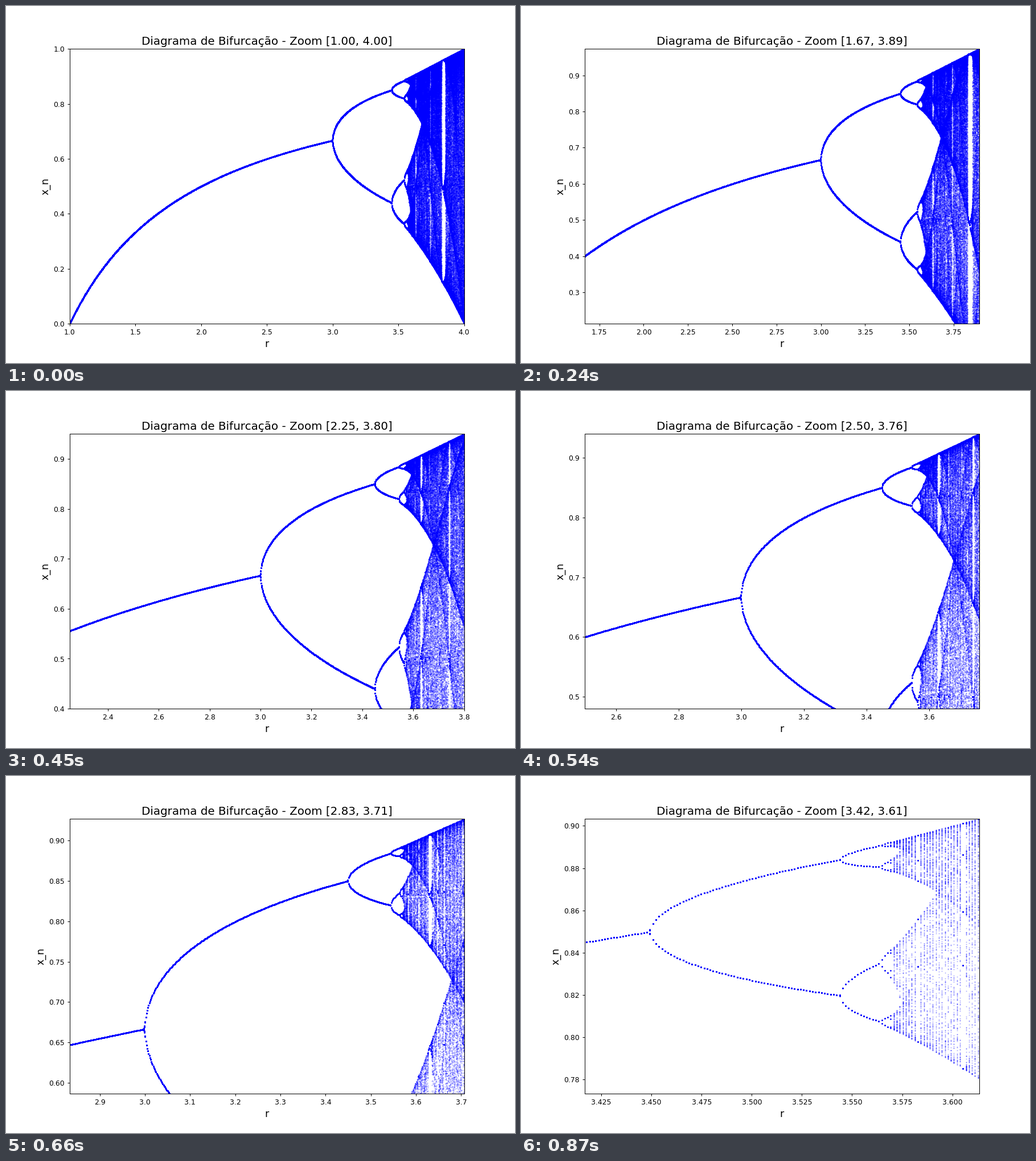
Recreate the animation shown at these times as a matplotlib script. Size 894 by 626 pixels, loop 0.9 s.

```python
import numpy as np
import matplotlib.pyplot as plt
from matplotlib.animation import FuncAnimation

DPI = 89.4
FRAMES = 30
COLUMNS = 2000
WARMUP, KEPT = 1000, 500

START = np.array([1.0, 4.0, 0.0, 1.0])  # r min, r max, x min, x max
END = np.array([3.5, 3.6, 0.8, 0.9])


def logistic_orbits():
    r = np.linspace(1, 4, COLUMNS)
    x = np.full(COLUMNS, 0.5)
    for _ in range(WARMUP):
        x = r * x * (1 - x)
    rs, xs = [], []
    for n in range(KEPT):
        x = r * x * (1 - x)
        # settled columns only repeat one value, so fewer points suffice
        keep = (r > 2.95) | (n % 3 == 0)
        rs.append(r[keep])
        xs.append(x[keep])
    return np.concatenate(rs), np.concatenate(xs)


R, X = logistic_orbits()

# the small margin keeps the canvas from truncating to 625 pixels
fig, ax = plt.subplots(figsize=(894.01 / DPI, 626.01 / DPI), dpi=DPI)
dots, = ax.plot([], [], "b.", markersize=1, alpha=0.35)
ax.set_xlabel("r", fontsize=14)
ax.set_ylabel("x_n", fontsize=14)
title = ax.set_title("", fontsize=16)


def update(i):
    r0, r1, x0, x1 = START + (END - START) * i / FRAMES
    pad_r, pad_x = (r1 - r0) / 200, (x1 - x0) / 200
    seen = ((R > r0 - pad_r) & (R < r1 + pad_r)
            & (X > x0 - pad_x) & (X < x1 + pad_x))
    dots.set_data(R[seen], X[seen])
    ax.set_xlim(r0, r1)
    ax.set_ylim(x0, x1)
    title.set_text(f"Diagrama de Bifurcação - Zoom [{r0:.2f}, {r1:.2f}]")
    return dots, title


anim = FuncAnimation(fig, update, frames=FRAMES, interval=30,
                     repeat=True, repeat_delay=0, blit=False)
plt.show()
```
